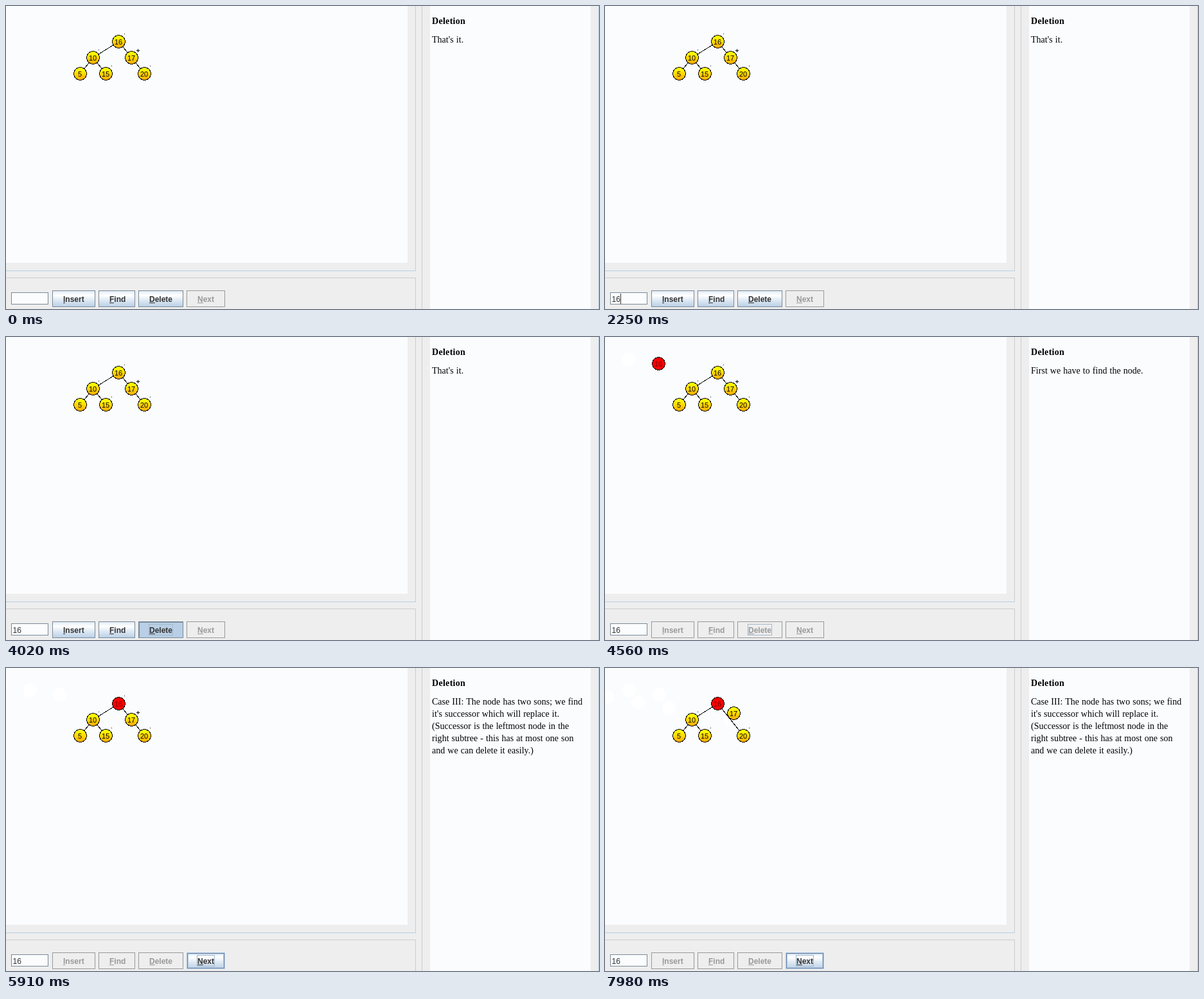
These frames come from a looping animation (923 by 472 pixels, 8 s). An HTML page:

```html
<!DOCTYPE html>
<html lang="en">
<head>
<meta charset="utf-8">
<title>Tree deletion</title>
<style>
html, body { margin: 0; width: 100%; height: 100%; overflow: hidden; background: #eee; }
svg { display: block; shape-rendering: crispEdges; }
text { font-family: "Liberation Sans", Arial, sans-serif; white-space: pre; }
.node { font-size: 11px; text-anchor: middle; }
.btn { font-size: 12px; font-weight: bold; }
.field { font-size: 12px; fill: #333; }
.note { font: 14px "Liberation Serif", "Times New Roman", serif; word-spacing: .5px; letter-spacing: .03px; }
.head { font-weight: bold; letter-spacing: .3px; }
</style>
</head>
<body>
<svg width="923" height="472" viewBox="0 0 923 472">
  <defs>
    <linearGradient id="gold" x2="0" y2="1">
      <stop offset=".1" stop-color="#ff0"/><stop offset="1" stop-color="#ffa800"/>
    </linearGradient>
    <linearGradient id="steel" x2="0" y2="1">
      <stop stop-color="#dde8f3"/><stop offset=".3" stop-color="#fff"/>
      <stop offset=".6" stop-color="#dde8f3"/><stop offset="1" stop-color="#b8cfe5"/>
    </linearGradient>
  </defs>
  <g id="scene"></g>
</svg>
<script>
const LOOP = 8000, PAPER = '#fafcfe', DARK = '#7a8a99', PALE = '#b8cfe5', OFF = '#999';
const scene = document.getElementById('scene');

const box = (x, y, w, h, fill) => `<rect x="${x}" y="${y}" width="${w}" height="${h}" fill="${fill}"/>`;
const frame = (x, y, w, h, stroke) =>
  `<rect x="${x + .5}" y="${y + .5}" width="${w - 1}" height="${h - 1}" fill="none" stroke="${stroke}"/>`;
const text = (cls, x, y, str, fill = '#000') => `<text class="${cls}" x="${x}" y="${y}" fill="${fill}">${str}</text>`;
const line = (x1, y1, x2, y2) =>
  `<path d="M${x1 + .5} ${y1 + .5}L${x2 + .5} ${y2 + .5}" stroke="#000"/>`;
const node = (x, y, label, fill = 'url(#gold)', ink = '#000') =>
  `<circle cx="${x + .5}" cy="${y + .5}" r="10" fill="${fill}" stroke="#000"/>` + text('node', x, y + 5, label, ink);
const hole = (x, y) => `<circle cx="${x + .5}" cy="${y + .5}" r="10.7" fill="#fff"/>`;

const within = (t, ...spans) => spans.some(([a, b]) => t >= a && t < b);
const count = (t, times) => times.filter(s => s <= t).length;

// name, x, width, label x, label width, width of the underlined letter
const buttons = [
  ['Insert', 72, 67, 89, 33, 3], ['Find', 144, 57, 161, 23, 7],
  ['Delete', 206, 70, 223, 36, 9], ['Next', 281, 60, 298, 26, 9]
];
const hovers = {
  Insert: [[720, 750], [3180, 3240]], Find: [[3240, 3420]],
  Delete: [[420, 720], [3420, 4110]], Next: [[5100, LOOP]]
};
const presses = { Insert: [], Find: [], Delete: [[4020, 4110]], Next: [[5790, 5910], [7620, 7710]] };

function button(t, [name, x, w, tx, tw, uw]) {
  const y = 443, h = 26;
  const on = name === 'Next' ? t >= 4650 : t < 4110;
  const pressed = within(t, ...presses[name]);
  const focus = name === 'Delete' ? within(t, [4020, 5790]) : name === 'Next' && t >= 5790;
  const ink = on ? '#333' : OFF;
  let s = box(x, y, w, h, !on ? '#eee' : pressed ? PALE : 'url(#steel)');
  if (on && !pressed && within(t, ...hovers[name]))
    s += frame(x, y, w, h, PALE) + frame(x + 2, y + 2, w - 4, h - 4, PALE) + frame(x + 1, y + 1, w - 2, h - 2, '#6b82a6');
  else s += frame(x, y, w, h, on ? DARK : OFF);
  if (pressed) s += box(x, y, w, 2, DARK) + box(x, y, 2, h, DARK);
  if (focus) s += frame(tx - 1, 447, tw + 2, 18, '#a3b8cc');
  return s + text('btn', tx, 461, name, ink) + box(tx, 462, uw, 1, ink);
}

function field(t) {
  const typed = '16'.slice(0, count(t, [1980, 2250]));
  const caret = within(t, [1350, 1770], [1980, 2730], [3180, 3630]);
  return box(8, 446, 58, 19, PAPER) + frame(8, 446, 58, 19, DARK) + text('field', 10.5, 461, typed) +
    (caret ? box(10 + 7 * typed.length, 448, 1, 16, '#333') : '');
}

// A node flying in by equal hops; the first three stops leave pale spots.
function flight(t, times, x, y, dx, dy, ...look) {
  const n = count(t, times), at = i => [x + dx * i, y + dy * i];
  let spots = '';
  for (let i = 0; i < Math.min(n - 1, 3); i++) spots += hole(...at(i));
  return { spots, body: n ? node(...at(n - 1), ...look) : '' };
}

function tree(t) {
  const red = flight(t, [4440, 4500, 4530, 4590, 4620], -9, 27, 46, 7, '16', '#f00', '#600');
  const gray = flight(t, [6240, 6270, 6330, 6360, 6420], 3, 44, 48, 9, '- ∞', '#c0c0c0');
  const lift = count(t, [7740, 7800, 7860, 7920, 7980]);
  let s = red.spots + gray.spots;
  if (lift) s += hole(195, 80) + line(175, 55, 215, 105);
  else s += line(175, 55, 195, 80) + line(195, 80, 215, 105) + box(203, 69, 5, 1, '#000') + box(205, 67, 1, 5, '#000');
  s += line(175, 55, 135, 80) + line(135, 80, 115, 105) + line(135, 80, 155, 105);
  if (t < 5970) s += box(184, 43, 1, 1, '#000');
  for (const [x, y] of [[144, 68], [164, 93], [224, 93]]) s += box(x, y, 1, 1, '#000');
  s += node(175, 55, '16') + node(135, 80, '10') + node(115, 105, '5') + node(155, 105, '15') + node(215, 105, '20');
  if (!lift) s += node(195, 80, '17');
  s += red.body;
  return s + (lift ? node(195 + lift, 80 - 2 * lift, '17') : gray.body);
}

function notes(t) {
  const lines = t < 4110 ? ["That's it."] : t < 5910 ? ['First we have to find the node.'] : [
    'Case III: The node has two sons; we find', "it's successor which will replace it.",
    '(Successor is the leftmost node in the', 'right subtree - this has at most one son',
    'and we can delete it easily.)'
  ];
  return text('note head', 663, 28, 'Deletion') + lines.map((l, i) => text('note', 663, 57 + 19 * i, l)).join('');
}

const panels = box(0, 0, 923, 472, '#eee') + box(0, 0, 625, 400, PAPER) + box(660, 0, 250, 472, PAPER) +
  box(637, 0, 1, 412, '#ccc') + box(0, 412, 638, 1, '#b8cfe5') +
  box(0, 423, 638, 1, '#ccc') + box(637, 423, 1, 49, '#ccc') +
  box(647, 0, 1, 472, '#ccc') + box(922, 0, 1, 472, '#b8cfe5');

let last = '';
function draw() {
  const t = performance.now() % LOOP;
  const next = panels + tree(t) + notes(t) + field(t) + buttons.map(b => button(t, b)).join('');
  if (next !== last) scene.innerHTML = last = next;
  requestAnimationFrame(draw);
}
draw();
</script>
</body>
</html>
```
